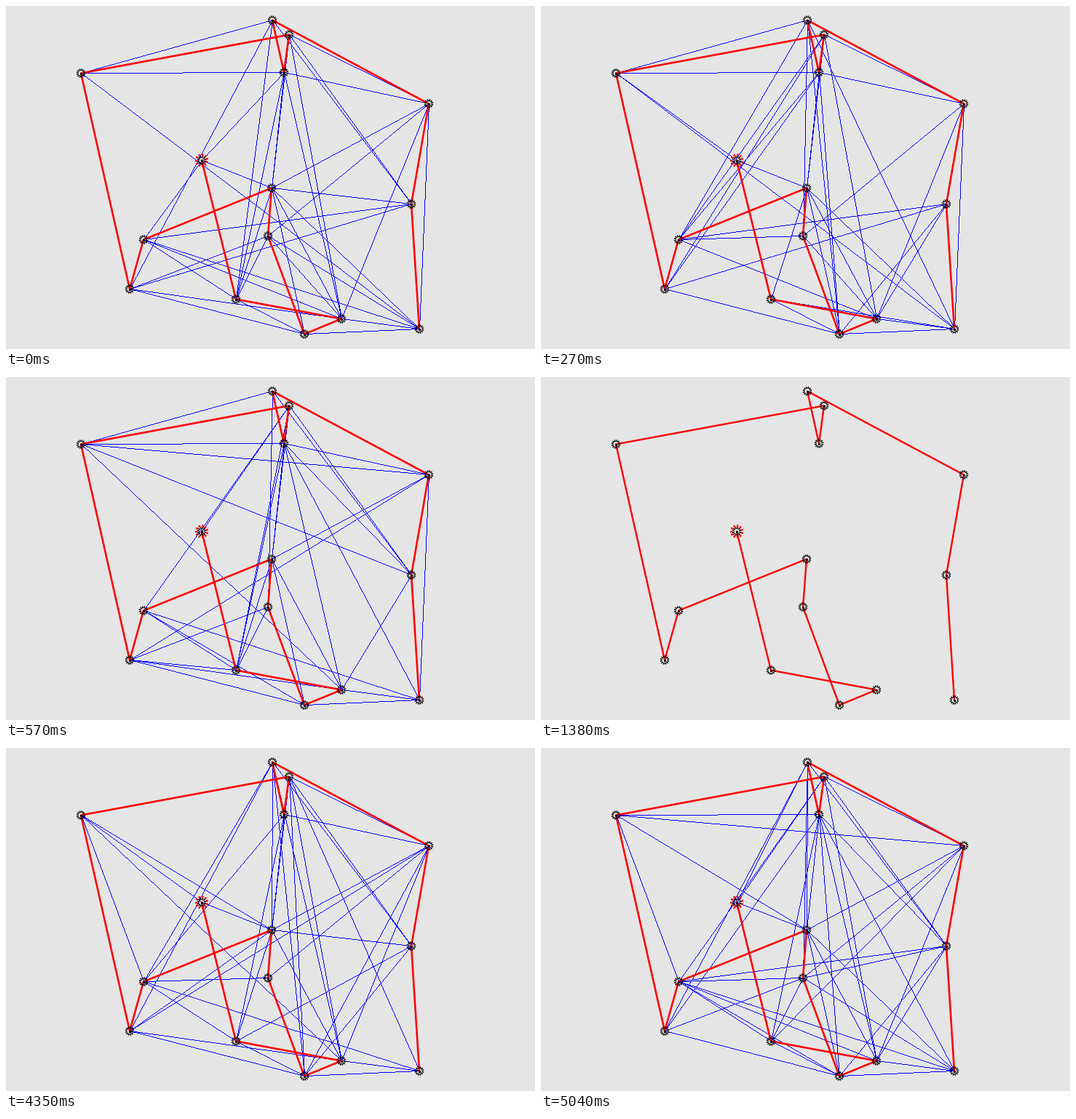
A matplotlib script that plays this animation: 727 px wide and 472 px high, repeating every 5570 ms.

```python
import random
import numpy as np
import matplotlib.pyplot as plt
from matplotlib.animation import FuncAnimation
from matplotlib.collections import LineCollection
from matplotlib.patches import Polygon

W, H, DPI = 727, 472, 64
PX = 72 / DPI  # one pixel in points
STEP, LOOP = 10, 5570
BACK, BLUE = (229, 229, 229), (0, 0, 255)

NODES = dict(
    A=(366, 19), B=(389, 39), C=(382, 91), D=(103, 92), E=(581, 134),
    F=(269, 212), G=(365, 250), H=(557, 272), I=(360, 316), J=(189, 321),
    K=(170, 389), L=(316, 403), M=(461, 430), N=(410, 451), O=(568, 444))
POS = {k: (x, y + 0.5) for k, (x, y) in NODES.items()}
ROUTE = "FLMNIGJKDBCAEHO"
START = "F"

# Each trial links node pairs; a pair is written as two letters.
TRIAL_1 = """AD AH BH BE AK CF FJ DC DO FG GH GE IE JH KH KI EM EO JL JM JO
KN KM MO LN NO LC LA LG LI CG BG BM CM GM GO GN IM IO CE""".split()
TRIAL_2 = """AD BE CE AJ BJ CJ BK CK DC DF DO FG AI AN CN AO BM CG BG EI EM EO
HJ HK HM HN JI JM KN LG LN LO MO NO GN GM GO IM""".split()
TRIAL_3 = """AD AH BH CH DE DH DM DC CE BJ BF AI CG BG BL CL GL IL CM CO GE EK
EO IK KL KM KN JL JN JO GM GN HM MO NO""".split()
TRIAL_4 = """DJ DF DG DM AJ AK CJ AG AN AM AH BH BE BO BM BN CG BG CL CE FG GH
GE GK EK EI EN EM HL HN JI JL JO KN KM MO NO LG LN GM""".split()
TRIAL_5 = """DJ DG DC DE AF AK BJ BF CK AG AI CG CL BM CM CN CO CH AH BH BE FG
EG EI EL EM HJ HI HM HN JI JL JM JN JO KI KN LN GN GM GO IL IO MO NO""".split()


def blend(first, second, seed):
    """Keep shared links and about half of the others."""
    rng = random.Random(seed)
    shared = set(first) & set(second)
    links = sorted(set(first) | set(second))
    return [e for e in links if e in shared or rng.random() < 0.5]


# (start in ms, links, cursor tip)
SCENES = [
    (0, TRIAL_1, None),
    (150, blend(TRIAL_1, TRIAL_2, 1), None),
    (270, TRIAL_2, None),
    (420, blend(TRIAL_2, TRIAL_3, 2), None),
    (570, TRIAL_3, None),
    (1380, [], None),
    (2530, TRIAL_3, None),
    (4350, TRIAL_4, None),
    (4490, TRIAL_5, None),
    (4770, TRIAL_5, (428, 427)),
    (4890, TRIAL_5, (560, 462)),
    (5040, TRIAL_5, None),
]
STARTS = [s[0] for s in SCENES]
ARROW = np.array([(0, 0), (0, 16), (4, 12.5), (6.5, 18), (8.8, 17),
                  (6.3, 11.5), (11, 11.5)]) + 0.5


def web(links):
    """Backdrop with hard one-pixel lines between linked nodes."""
    image = np.full((H, W, 3), BACK, np.uint8)
    for a, b in links:
        (x0, y0), (x1, y1) = NODES[a], NODES[b]
        count = max(abs(x1 - x0), abs(y1 - y0)) + 1
        cols = np.rint(np.linspace(x0, x1, count)).astype(int)
        rows = np.rint(np.linspace(y0, y1, count)).astype(int)
        image[rows, cols] = BLUE
    return image


def spokes(center, r0, r1, count):
    angles = (np.arange(count) + 0.5) * 2 * np.pi / count
    rays = np.column_stack([np.cos(angles), np.sin(angles)])
    return [(center + r0 * ray, center + r1 * ray) for ray in rays]


def ticks(segments, color, width):
    ax.add_collection(LineCollection(segments, colors=color, zorder=4,
                                     linewidths=width * PX), autolim=False)


WEBS = [web(links) for _, links, _ in SCENES]

fig = plt.figure(figsize=(W / DPI, H / DPI), dpi=DPI, facecolor="#e5e5e5")
ax = fig.add_axes([0, 0, 1, 1])
backdrop = ax.imshow(WEBS[0], extent=(0, W, H, 0), aspect="auto",
                     interpolation="nearest", zorder=0)
ax.set_xlim(0, W)
ax.set_ylim(H, 0)
ax.axis("off")

centers = np.array(list(POS.values()))
route, = ax.plot(*zip(*(POS[k] for k in ROUTE)), color="red", lw=2.6 * PX,
                 solid_joinstyle="round", zorder=3)
halos = ax.scatter(*centers.T, s=(7 * PX) ** 2, c="white", linewidths=0,
                   zorder=1)
ticks([s for c in centers for s in spokes(c, 3.4, 6.3, 12)], "black", 1.6)
ticks(spokes(np.array(POS[START]), 6.2, 9.2, 11), "red", 2.4)
ax.scatter(*centers.T, s=(3 * PX) ** 2, c="black", marker="s",
           linewidths=0, zorder=5)
cursor = Polygon(ARROW, closed=True, fc="white", ec="black", lw=PX, zorder=6)
ax.add_patch(cursor)


def update(i):
    k = int(np.searchsorted(STARTS, i * STEP, side="right")) - 1
    _, links, tip = SCENES[k]
    backdrop.set_data(WEBS[k])
    halos.set_visible(not links)
    route.set_linewidth((2.6 if links else 2.4) * PX)
    cursor.set_visible(tip is not None)
    if tip:
        cursor.set_xy(ARROW + tip)
    return backdrop, halos, route, cursor


anim = FuncAnimation(fig, update, frames=LOOP // STEP, interval=STEP,
                     init_func=lambda: update(0), repeat=True, repeat_delay=0)
plt.show()
```
